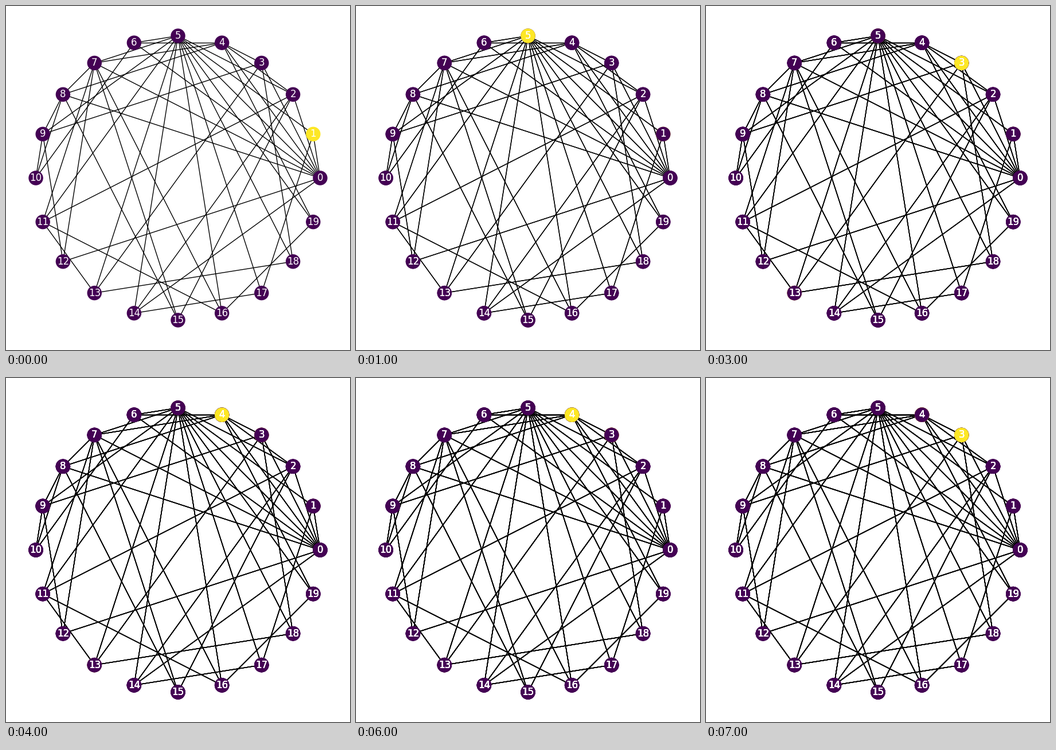
Animation, 600 px wide and 600 px high, one loop 8 s. Source, as a matplotlib script:

```python
import numpy as np
import matplotlib.pyplot as plt
from matplotlib.animation import FuncAnimation
from matplotlib.collections import LineCollection

NODES = 20
STEP_MS = 1000
DARK, BRIGHT = "#440154", "#fde725"

# Each node with the later nodes linked to it; 0 and 5 are the hubs.
LINKS = {
    0: [*range(1, 9), 12, 14],
    5: [1, 2, 6, 7, 9, 11, 13, 14, *range(16, 20)],
    7: [4, 8, 11, 12, 15, 16],
    2: [4, 11, 14, 15],
    3: [4, 9, 13, 18],
    4: [6, 8, 19],
    8: [9, 10, 15],
    9: [10, 12],
    11: [13, 16],
    17: [1, 14],
    6: [10],
    13: [18],
    16: [19],
}
EDGES = [(a, b) for a, ends in LINKS.items() for b in ends]

# A walk along the edges that ends up swinging around node 3.
WALK = [1, 5, 13] + [3, 4] * 2 + [3]

angle = 2 * np.pi * np.arange(NODES) / NODES
pos = np.column_stack([np.cos(angle), np.sin(angle)])

fig = plt.figure(figsize=(6, 6), dpi=100, facecolor="white")
ax = fig.add_axes([0, 0, 1, 1])
ax.set_axis_off()


def draw_layer(active):
    """Draw the whole graph once, with one node lit."""
    colors = [BRIGHT if n == active else DARK for n in range(NODES)]
    lines = LineCollection([pos[list(e)] for e in EDGES],
                           colors="black", linewidths=1.0, zorder=1)
    ax.add_collection(lines)
    dots = ax.scatter(pos[:, 0], pos[:, 1], s=300, c=colors,
                      linewidths=1.0, zorder=2)
    labels = [ax.text(x, y, str(n), size=12, color="white", family="DejaVu Sans",
                      ha="center", va="center", zorder=3)
              for n, (x, y) in enumerate(pos)]
    return [lines, dots, *labels]


layers = [draw_layer(node) for node in WALK]
ax.set_xlim(-1.21, 1.21)
ax.set_ylim(-1.21, 1.21)


def update(step):
    # Each step is painted over the earlier ones, so edges and text grow heavier.
    for i, layer in enumerate(layers):
        for artist in layer:
            artist.set_visible(i <= step)
    return []


anim = FuncAnimation(fig, update, frames=len(WALK), interval=STEP_MS,
                     init_func=lambda: update(0), repeat=True, repeat_delay=0)
plt.show()
```
